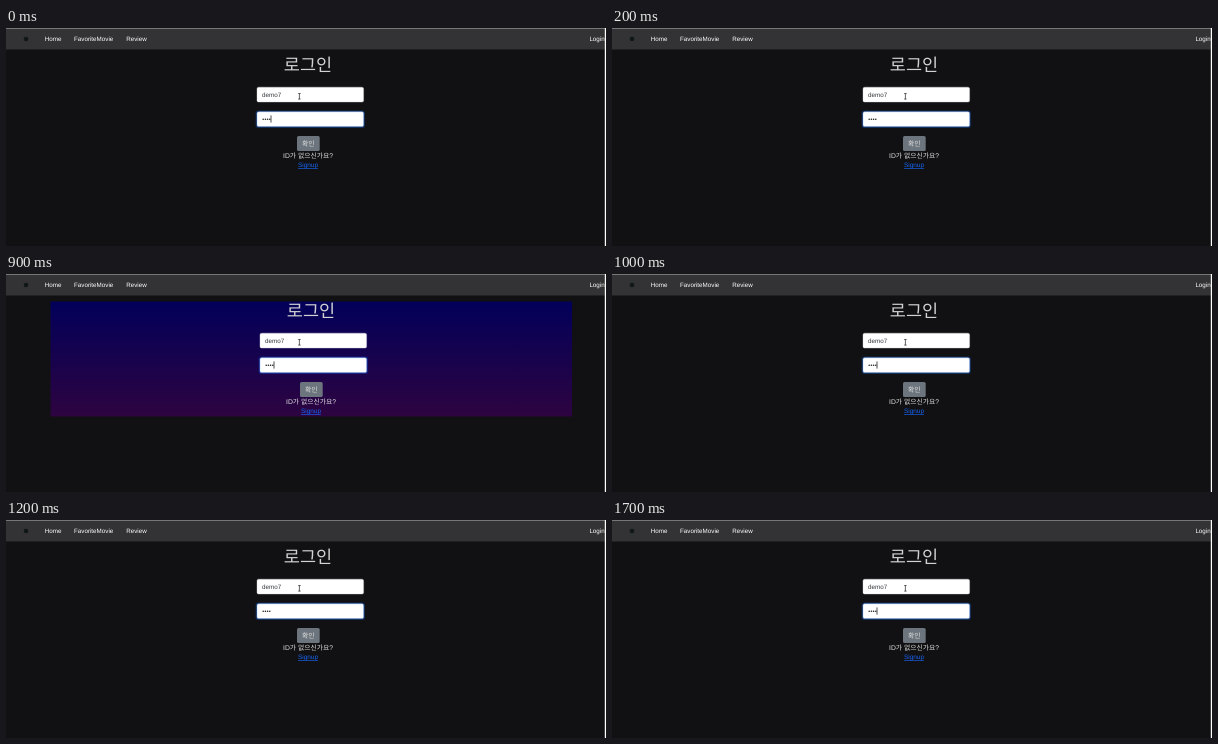
These frames come from a looping animation (600x218 px, 2 s). An HTML page:

```html
<!DOCTYPE html>
<html lang="ko">
<head>
<meta charset="utf-8">
<title>로그인</title>
<style>
  html, body { margin: 0; width: 100%; height: 100%; overflow: hidden; background: #111012; }
  svg { display: block; width: 600px; height: 218px; }
  text {
    font: 6.25px "Liberation Sans", "Noto Sans CJK KR", "Noto Sans CJK", sans-serif;
    fill: #fff;
    text-rendering: geometricPrecision;
  }
  .middle { text-anchor: middle; }
  .title { font-size: 17.5px; font-weight: 300; fill: #d2d2d2; }
  .korean { font-size: 6.8px; fill: #e2e2e2; }
  .typed { fill: #33363a; }
  .link { font-size: 6.4px; fill: #1765f5; text-decoration: underline; }
</style>
</head>
<body>
<svg viewBox="0 0 600 218">
  <defs>
    <linearGradient id="night" x2="0" y2="1">
      <stop stop-color="#02005a"/>
      <stop offset="1" stop-color="#2d0440"/>
    </linearGradient>
  </defs>

  <rect width="600" height="218" fill="#111012"/>
  <rect width="600" height="21.5" fill="#333234"/>
  <rect width="600" height=".8" fill="#888"/>
  <circle cx="20" cy="11" r="2.3" fill="#101719"/>
  <text x="38.7" y="13">Home</text>
  <text x="68" y="13">FavoriteMovie</text>
  <text x="120.2" y="13">Review</text>
  <text x="583.4" y="13">Login</text>
  <rect x="598.8" width="1.2" height="218" fill="#fff"/>

  <rect id="panel" x="44.5" y="27.5" width="521.5" height="115" fill="url(#night)"/>

  <g id="form">
    <text class="middle title" x="302" y="42.6">로그인</text>

    <rect x="251" y="59.2" width="106.6" height="14.8" rx="1.6" fill="#fff" stroke="#ced4da" stroke-width=".4"/>
    <text class="typed" x="256" y="69">demo7</text>

    <rect x="249.6" y="82.4" width="109.4" height="17.6" rx="2.8" fill="#0d6efd" opacity=".28"/>
    <rect x="251" y="83.8" width="106.6" height="14.8" rx="1.6" fill="#fff" stroke="#86b7fe" stroke-width=".4"/>
    <path d="M257.2 91.2h6.7" stroke="#222" stroke-width="1.6" stroke-linecap="round" stroke-dasharray="0 2.2"/>
    <rect id="caret" x="264.6" y="87.4" width=".8" height="7.2" fill="#222"/>

    <rect x="291" y="108" width="22.7" height="15" rx="1.6" fill="#6c757d"/>
    <text class="middle korean" x="302.3" y="118">확인</text>
    <text class="middle korean" x="302" y="130">ID가 없으신가요?</text>
    <text class="middle link" x="302" y="139.3">Signup</text>
  </g>

  <path d="M292.2 65.5h2.4M293.4 65.5v5.6M292.2 71.1h2.4" fill="none" stroke="#222" stroke-width=".7"/>
</svg>
<script>
  const LOOP = 2000, BLINK = 500, CARET_OFF = 200;
  const [panel, form, caret] = ["panel", "form", "caret"].map(id => document.getElementById(id));
  const show = (el, on) => el.setAttribute("visibility", on ? "visible" : "hidden");

  function draw(now) {
    const t = now % LOOP;
    const flash = t >= 900 && t < 1000;
    show(panel, flash);
    form.setAttribute("transform", `translate(${flash ? 3 : 0})`);
    show(caret, Math.floor((t - CARET_OFF) / BLINK) % 2);
  }

  const start = performance.now();
  function tick() {
    draw(performance.now() - start);
    requestAnimationFrame(tick);
  }
  tick();
</script>
</body>
</html>
```
